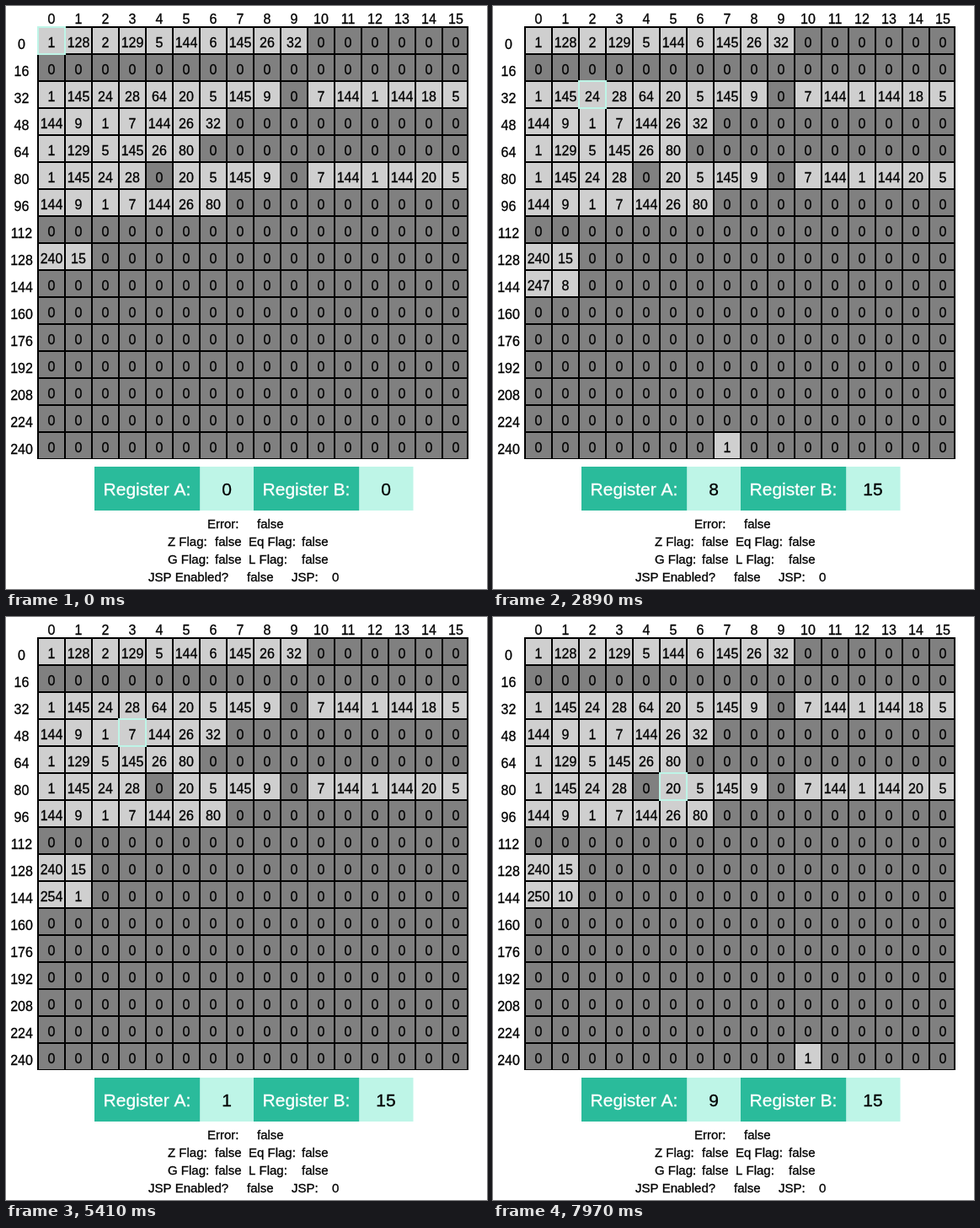
Recreate the animation shown at these times as an HTML page with a canvas. Size 571 by 691 pixels, loop 8 s.

```html
<!DOCTYPE html>
<html lang="en">
<head>
<meta charset="utf-8">
<title>Memory view</title>
<style>
  html, body { margin: 0; width: 100%; height: 100%; overflow: hidden; background: #fff; }
  canvas { display: block; width: 571px; height: 691px; }
</style>
</head>
<body>
<canvas id="stage"></canvas>
<script>
const LOOP = 8000, WIDTH = 571, HEIGHT = 691;
const LEFT = 37, TOP = 24, CELL = 32, LINE = 2;
const FONT = '"Liberation Sans", Arial, sans-serif';
const TEAL = '#2abb9b', MINT = '#bef5e7';

// Instructions of the simulated CPU: s is its state, x the operand byte.
const OPS = {
  loadA: { code: 1, run: (s, x) => { s.a = s.mem[x]; } },
  loadB: { code: 2, run: (s, x) => { s.b = s.mem[x]; } },
  storeA: { code: 5, run: (s, x) => { s.mem[x] = s.a; } },
  storeB: { code: 6, run: (s, x) => { s.mem[x] = s.b; } },
  storeAt: { code: 7, run: (s, x) => { s.mem[s.mem[x]] = s.a; } },
  setA: { code: 9, run: (s, x) => { s.a = x; } },
  incA: { code: 18, run: s => { s.a++; } },
  decA: { code: 20, run: s => { s.a--; } },
  testA: { code: 24, run: s => { s.zero = s.a === 0; } },
  jump: { code: 26, run: (s, x) => { s.next = x; } },
  jumpZero: { code: 28, run: (s, x) => { if (s.zero) s.next = x; } }
};
const runByCode = Object.fromEntries(Object.values(OPS).map(op => [op.code, op.run]));

const FIRST = 128, COUNT = 129, POSITION = 144, REMAINING = 145;
const START = 0, MOVE_RIGHT = 32, TURN = 64, MOVE_LEFT = 80;

const assemble = source =>
  source.trim().split(/\s+/).map(word => word in OPS ? OPS[word].code : Number(word));

// Moves a lit cell one place per pass until none remain, then jumps to exit.
const mover = (self, exit, step) => assemble(`
  loadA ${REMAINING} testA jumpZero ${exit} decA storeA ${REMAINING}
  setA 0 storeAt ${POSITION}
  loadA ${POSITION} ${step} storeA ${POSITION}
  setA 1 storeAt ${POSITION} jump ${self}`);

function initialMemory() {
  const mem = new Uint8Array(256);
  mem.set(assemble(`loadA ${FIRST} loadB ${COUNT} storeA ${POSITION} storeB ${REMAINING}
    jump ${MOVE_RIGHT}`), START);
  mem.set(mover(MOVE_RIGHT, TURN, 'incA'), MOVE_RIGHT);
  mem.set(assemble(`loadA ${COUNT} storeA ${REMAINING} jump ${MOVE_LEFT}`), TURN);
  mem.set(mover(MOVE_LEFT, START, 'decA'), MOVE_LEFT);
  mem.set([240, 15], FIRST);
  return mem;
}

// Each clock tick consumes one byte.
function tick(state) {
  const s = { ...state, mem: state.mem.slice(), pc: state.next, next: state.next + 1 };
  const byte = s.mem[s.pc];
  if (s.pending) {
    s.pending(s, byte);
    s.pending = null;
  } else if (runByCode[byte].length === 2) {
    s.pending = runByCode[byte];
  } else {
    runByCode[byte](s);
  }
  return s;
}

const states = [tick({ mem: initialMemory(), a: 0, b: 0, zero: false, next: START, pending: null })];
while (states.length < 500) states.push(tick(states[states.length - 1]));

// The clock drifts slightly around 16.2 ms per tick: [ms, ticks]
const CLOCK = [[0, -5.5], [1790, 105], [2890, 174.2], [6110, 371.1], [7970, 486.4]];

function ticksAt(t) {
  const i = Math.max(1, CLOCK.findLastIndex(([time]) => time < t) + 1);
  const end = Math.min(i, CLOCK.length - 1);
  const [t0, n0] = CLOCK[end - 1], [t1, n1] = CLOCK[end];
  return n0 + (n1 - n0) * (t - t0) / (t1 - t0);
}

const stateAt = ticks => states[Math.max(0, Math.floor(ticks))];

const canvas = document.getElementById('stage');
const ctx = canvas.getContext('2d');
const ratio = window.devicePixelRatio || 1;
canvas.width = WIDTH * ratio;
canvas.height = HEIGHT * ratio;
ctx.scale(ratio, ratio);

function box(x, y, w, h, color) {
  ctx.fillStyle = color;
  ctx.fillRect(x, y, w, h);
}

// A hairline stroke gives the slightly heavier weight of smoothed text.
function text(value, x, y, size, align = 'center', color = '#000') {
  ctx.font = `${size}px ${FONT}`;
  ctx.textAlign = align;
  ctx.fillStyle = ctx.strokeStyle = color;
  ctx.lineWidth = 0.3;
  ctx.fillText(value, x, y);
  ctx.strokeText(value, x, y);
}

const cellX = i => LEFT + (i % 16) * CELL;
const cellY = i => TOP + (i >> 4) * CELL;

function drawMemory(values, styled) {
  box(LEFT, TOP, 16 * CELL, 16 * CELL + LINE / 2, '#000');
  for (let i = 0; i < 16; i++) {
    text(i, cellX(i) + 17, 20.5, 16);
    text(i * 16, 18.5, cellY(i * 16) + 26.5, 16);
  }
  values.forEach((value, i) => {
    const x = cellX(i), y = cellY(i);
    const width = CELL - LINE * (i % 16 === 15 ? 2 : 1);
    box(x + LINE, y + LINE, width, CELL - LINE, styled.mem[i] ? '#cfcfcf' : '#808080');
    text(value, x + 17, y + 24.8, 16);
  });
  ctx.strokeStyle = MINT;
  ctx.lineWidth = LINE;
  ctx.strokeRect(cellX(styled.pc) + 1, cellY(styled.pc) + 1, CELL, CELL);
}

function drawRegister(name, value, x) {
  box(x, 546, 125.5, 52, TEAL);
  box(x + 125.5, 546, 64, 52, MINT);
  text(`Register ${name}:`, x + 62.5, 580, 21, 'center', '#fff');
  text(value, x + 157, 580, 21);
}

function drawFlags(zero) {
  const rows = [
    [['Error:', 239], ['false', 298]],
    [['Z Flag:', 192], [zero, 248], ['Eq Flag:', 288], ['false', 351]],
    [['G Flag:', 192], ['false', 248], ['L Flag:', 288], ['false', 351]],
    [['JSP Enabled?', 169], ['false', 286], ['JSP:', 339], ['0', 387]]
  ];
  rows.forEach((row, i) => row.forEach(([label, x]) => text(label, x, 619 + i * 21, 15, 'left')));
}

function draw(t) {
  const ticks = ticksAt(t);
  const current = stateAt(ticks);
  box(0, 0, WIDTH, HEIGHT, '#fff');
  // Cell colours and the cursor trail the numbers by a fraction of a tick.
  drawMemory(current.mem, stateAt(ticks - 0.3));
  drawRegister('A', current.a, 105);
  drawRegister('B', current.b, 294);
  drawFlags(String(current.zero));
}

const begin = performance.now();
function frame() {
  draw((performance.now() - begin) % LOOP);
  requestAnimationFrame(frame);
}
frame();
</script>
</body>
</html>
```
